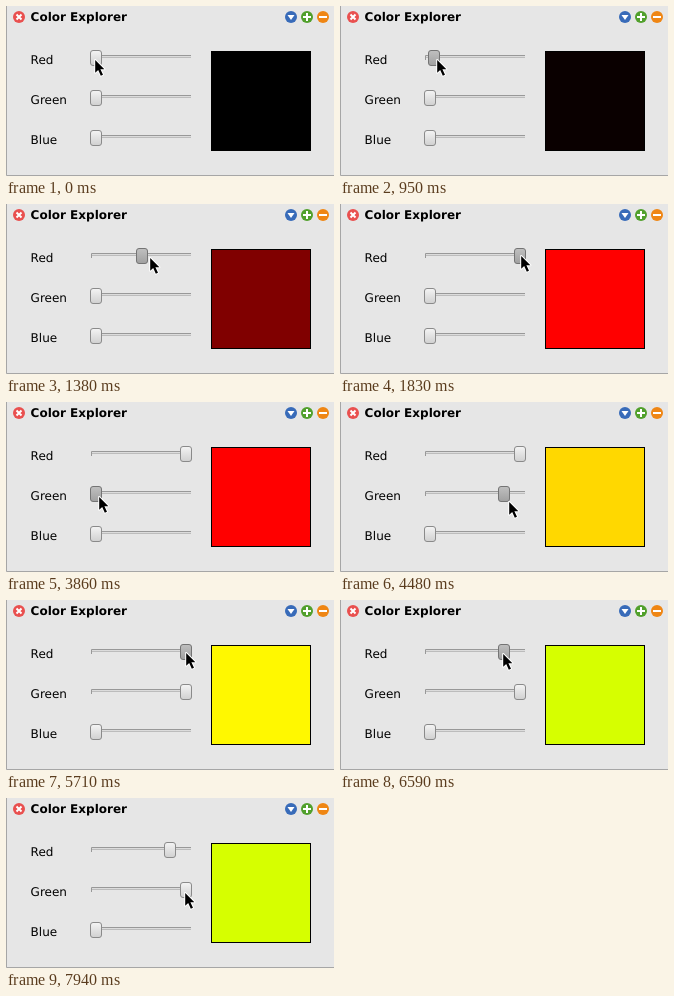
Recreate the animation shown at these times as an HTML page. Size 328 by 170 pixels, loop 8000 ms.

```html
<!DOCTYPE html>
<html lang="en">
<head>
<meta charset="utf-8">
<title>Color Explorer</title>
<style>
  html, body { margin: 0; width: 100%; height: 100%; overflow: hidden; background: #e6e6e6; }
  svg { display: block; }
  text { font: 12px "DejaVu Sans", sans-serif; fill: #000; text-rendering: geometricPrecision; }
  .title { font-weight: bold; }
  .knob rect { fill: url(#up); stroke: #8a8a8a; }
  .knob.down rect { fill: url(#down); stroke: #747474; }
  .sign { fill: none; stroke: #fff; stroke-width: 2; }
  #cursor { stroke: #fff; stroke-width: 2; stroke-linejoin: round; paint-order: stroke; }
</style>
</head>
<body>
<svg width="328" height="170" viewBox="0 0 328 170">
  <defs>
    <linearGradient id="up" x2="0" y2="1">
      <stop offset="0" stop-color="#f4f4f4"/>
      <stop offset="1" stop-color="#d0d0d0"/>
    </linearGradient>
    <linearGradient id="down" x2="0" y2="1">
      <stop offset="0" stop-color="#c0c0c0"/>
      <stop offset="1" stop-color="#a0a0a0"/>
    </linearGradient>
  </defs>
  <rect width="328" height="170" fill="#e6e6e6"/>
  <path d="M.5 0v169.5H328" fill="none" stroke="#a6a6a6"/>

  <circle cx="13" cy="11" r="6" fill="#e9504f"/>
  <path class="sign" d="M10.5 8.5l5 5m0-5l-5 5"/>
  <text class="title" x="24.6" y="15">Color Explorer</text>
  <circle cx="285" cy="11" r="6" fill="#386bb9"/>
  <path d="M281.5 9h7l-3.5 5z" fill="#fff"/>
  <circle cx="301" cy="11" r="6" fill="#51a02c"/>
  <path class="sign" d="M297 11h8m-4-4v8"/>
  <circle cx="317" cy="11" r="6" fill="#ef8614"/>
  <path class="sign" d="M313 11h8"/>

  <g id="sliders"></g>
  <rect id="swatch" x="205.5" y="45.5" width="99" height="99" stroke="#000"/>
  <path id="cursor" d="M1.2 2V14.7L4.2 12L6.8 17.7L9 16.7L6.4 11.2H10.4Z"/>
</svg>
<script>
const LOOP = 8000, TICK = 88;
const sliders = document.getElementById('sliders');
const swatch = document.getElementById('swatch');
const cursor = document.getElementById('cursor');

sliders.innerHTML = ['Red', 'Green', 'Blue'].map((name, i) => {
  const y = i * 40;
  return `<text x="24.6" y="${58 + y}">${name}</text>
    <path d="M85 ${50 + y}h100v1h-100z" fill="#dcdcdc"/>
    <path d="M85.5 ${54 + y}v-4.5h99.5" fill="none" stroke="#989898"/>
    <path d="M86 ${51.5 + y}h99" stroke="#bcbcbc"/>
    <g class="knob"><rect x="-5.5" y="${44.5 + y}" width="11" height="15" rx="2.5"/></g>`;
}).join('');
const knobs = [...sliders.querySelectorAll('.knob')];

const linear = p => p;
const easeIn = p => p * p;
const easeOut = p => 1 - (1 - p) ** 1.6;
const smooth = p => p * p * (3 - 2 * p);

const initial = { x: 88, y: 52, red: 90, green: 90, r: 0, g: 0, down: -1 };
const moves = [];
const move = (from, to, ease, goal) => moves.push({ from, to, ease, goal });
const set = (at, goal) => move(at, at, linear, goal);

// Drag red to full; the knob sets off one tick behind the pointer.
set(500, { down: 0 });
move(680, 1380, easeIn, { x: 143 });
move(770, 1380, easeIn, { red: 136, r: 128 });
move(1380, 1830, easeOut, { x: 180, y: 50, red: 180, r: 255 });
move(1830, 2010, linear, { x: 185 });
set(2190, { down: -1 });
set(2280, { x: 186 });

// Drag green to full.
move(2370, 2880, smooth, { x: 89, y: 95 });
set(3060, { x: 88, y: 93 });
set(3420, { down: 1 });
move(3690, 4480, easeIn, { x: 168, y: 98 });
move(3860, 4480, easeIn, { green: 164, g: 216 });
move(4480, 4570, linear, { g: 248 });
move(4480, 4910, easeOut, { x: 187, green: 180 });
set(5090, { down: -1 });

// Take red back a little, then return to green.
move(5090, 5620, smooth, { x: 179, y: 51 });
set(5710, { down: 0 });
move(5980, 6590, smooth, { x: 162, y: 52, red: 164, r: 214 });
set(6070, { g: 255 });
set(6950, { down: -1 });
move(7580, 7940, smooth, { x: 178, y: 93 });

// Motion advances in whole ticks.
function progress({ from, to, ease }, time) {
  if (time >= to) return 1;
  const ticks = Math.round((to - from) / TICK);
  return ease(Math.floor((time - from) / (to - from) * ticks + 0.1) / ticks);
}

function stateAt(time) {
  const state = { ...initial };
  for (const m of moves) {
    if (time < m.from) continue;
    const p = progress(m, time);
    for (const key in m.goal) state[key] += (m.goal[key] - state[key]) * p;
  }
  for (const key in state) state[key] = Math.round(state[key]);
  return state;
}

function draw(time) {
  const s = stateAt(time);
  [s.red, s.green, 90].forEach((x, i) => {
    knobs[i].setAttribute('transform', `translate(${x})`);
    knobs[i].classList.toggle('down', s.down === i);
  });
  swatch.setAttribute('fill', `rgb(${s.r},${s.g},0)`);
  cursor.setAttribute('transform', `translate(${s.x} ${s.y})`);
}

const start = performance.now();
function tick() {
  draw((performance.now() - start) % LOOP);
  requestAnimationFrame(tick);
}
draw(0);
requestAnimationFrame(tick);
</script>
</body>
</html>
```
